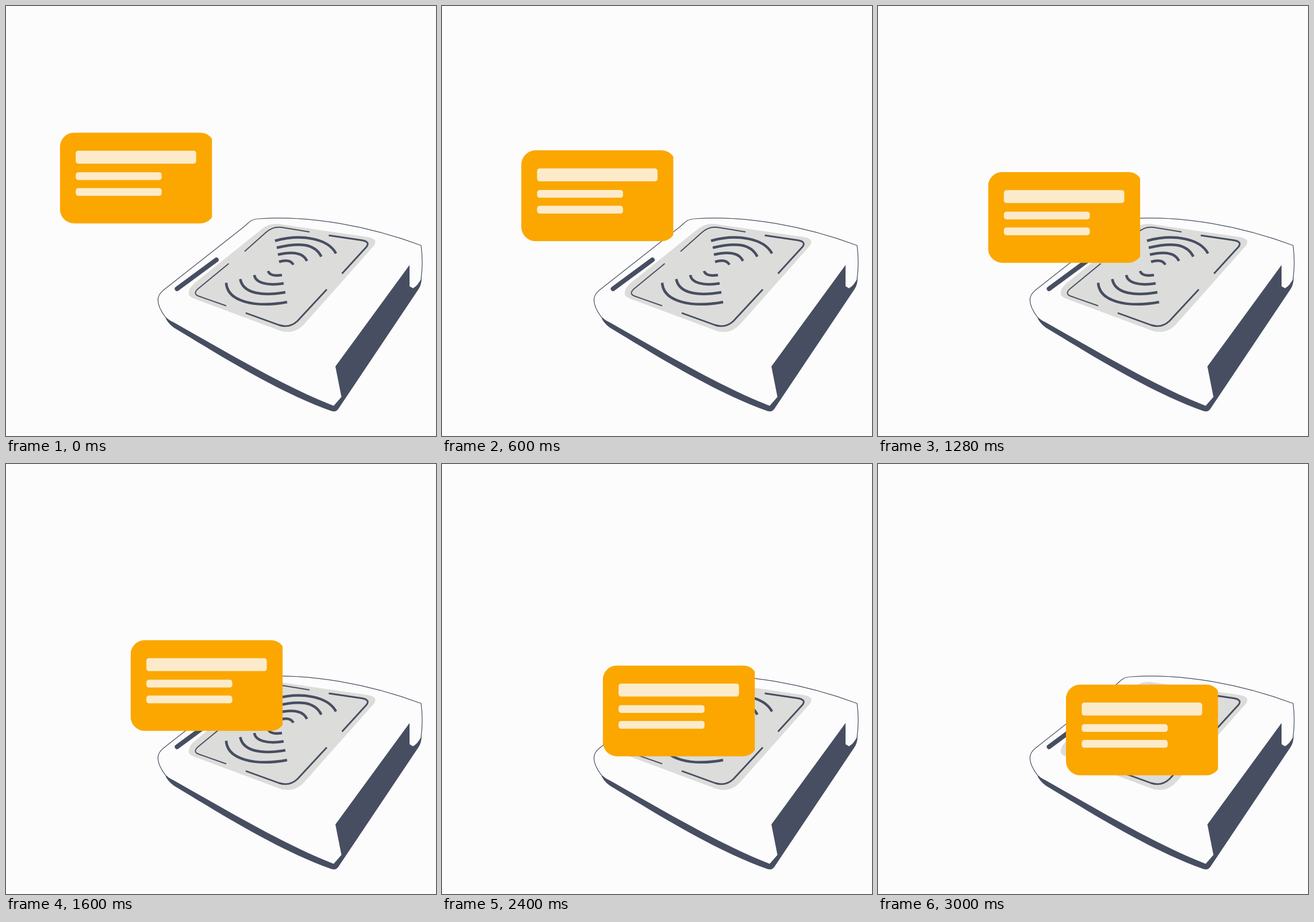
Animation of 748x748 px, one loop 3040 ms. Source, as an HTML page:

```html
<!DOCTYPE html>
<html lang="en">
<head>
<meta charset="utf-8">
<title>Card reader</title>
<style>
  html, body { margin: 0; width: 100%; height: 100%; overflow: hidden; background: #fcfcfc; }
  svg { display: block; width: 748px; height: 748px; }
  .line { fill: none; stroke: #474e61; }
  .dark { fill: #474e61; }
</style>
</head>
<body>
<svg viewBox="0 0 748 748">
  <!-- reader body -->
  <path class="line" stroke-width="1.2" d="M277 541C266 526 261 512 267 502Q270 497 278 491L414 384C423 377 424 371 441 370C530 364 632 383 722 416.5Q726 446 722 475"/>
  <path class="dark" d="M276 539Q282 546 293 551C380 600 480 660 570 695.500L583.500 680L573 627L702 450.500V487.500L708 491Q716 487 723 473Q723 484 718 492L578 701Q574 707 566 704.500C480 674 390 619 292 559.500Q280 551 276 539Z"/>
  <path class="line" stroke-width="8" stroke-linecap="round" d="M297.500 492L366 441.500"/>

  <!-- contact pad -->
  <path fill="#dcdcda" d="M318 498Q318 491 328 482L445 388Q459 377 476 379.500L630 402Q648 405 640 417L520 552Q504 571 480 566L327 509Q316 505 318 498Z"/>
  <g class="line">
    <path stroke-width="1.900" d="M415 427L452 394Q464 383 479 385L528 393M387.500 448L334 492Q324 501 336 505L383 521.500"/>
    <path stroke-width="2.900" d="M561.500 399L619 407.500Q634 410 627 419L584.500 465.500M417 534L475 555Q493 561 507 548L558 493"/>
    <path stroke-width="4.500" d="M468 408.500C513 396 560 404 574 430.500M471 420.500C510 411 537 413 548.500 436M473 432.500C500 426 517 430 523.500 443.500M475 445C488 441 496 443 500 450"/>
    <path stroke-width="4.500" d="M489 515C435 525 385 515 383 481.500M486 498C445 505 412 500 407.500 475M483 482.500C455 487 434 482 432 468M480 468C467 470 458 468 456 461"/>
  </g>

  <!-- card, cut off at its right edge -->
  <clipPath id="cut"><path d="M0 0H264.500V160H0Z"/></clipPath>
  <g id="card" clip-path="url(#cut)">
    <rect width="269" height="158" rx="25" fill="#fba700"/>
    <g fill="#fcebca">
      <rect x="27.500" y="31.500" width="209.500" height="22.500" rx="4.500"/>
      <rect x="27.500" y="69" width="149.500" height="13.500" rx="4.500"/>
      <rect x="27.500" y="96.500" width="149.500" height="13.500" rx="4.500"/>
    </g>
  </g>
</svg>
<script>
  const LOOP = 3040, STEP = 40;
  const card = document.getElementById("card");
  const start = performance.now();

  function draw() {
    const t = (performance.now() - start) % LOOP;
    // the first pose is held for two steps
    const step = Math.max(0, Math.floor(t / STEP) - 1);
    card.setAttribute("transform", `translate(${93.8 + step * 3.15} ${220.2 + step * 2.208})`);
    requestAnimationFrame(draw);
  }
  draw();
</script>
</body>
</html>
```
